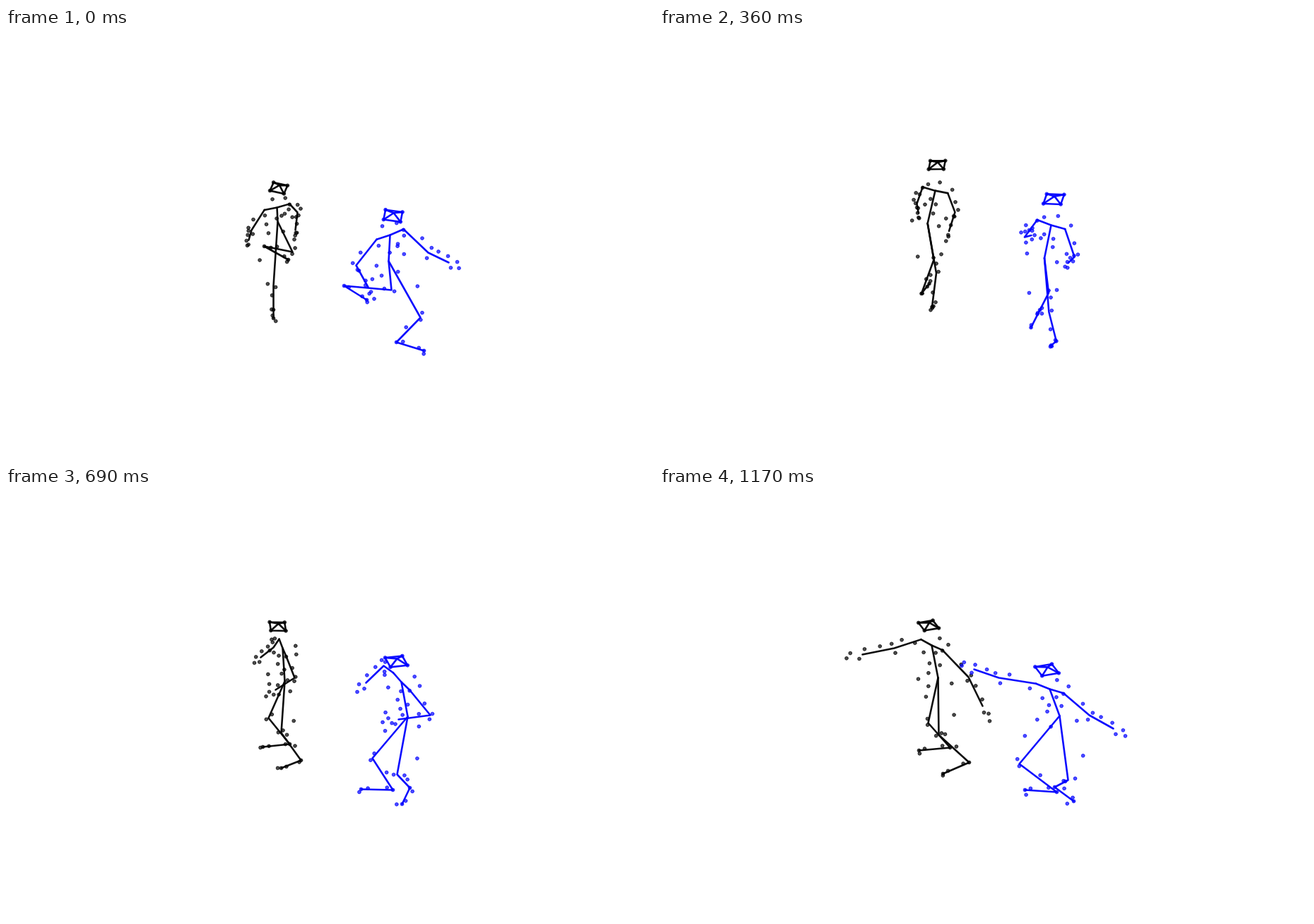
Animation, 917 px wide and 611 px high, one loop 1200 ms. Source, as an HTML page with a canvas:

```html
<!DOCTYPE html>
<html lang="en">
<head>
<meta charset="utf-8">
<title>Two dancers</title>
<style>
html, body { margin: 0; width: 100%; height: 100%; overflow: hidden; background: #fff; }
canvas { display: block; }
</style>
</head>
<body>
<canvas id="stage" width="917" height="611"></canvas>
<script>
const LOOP = 1200, STEP = 30;
const KEYS = [0, 240, 480, 690, 810, 960, 1170];
const BONES = [
  'pelvis spine neck', 'rShoulder neck lShoulder',
  'rShoulder rElbow rWrist', 'lShoulder lElbow lWrist',
  'pelvis rKnee rHeel rToe', 'pelvis lKnee lHeel lToe',
  'front right back left front', 'front crown back', 'right crown left'
].map(s => s.split(' '));
const TIPS = ['front', 'right', 'back', 'left', 'rHeel', 'rToe', 'lHeel', 'lToe'];

// Markers sit on a bone at `along`, moved outward, forward and up in the body's own axes.
const mark = (bone, along, out, fwd, up = 0) => ({ bone, along, out, fwd, up });
const TORSO = [
  mark('trunk', 1, 1.16, 0.54), mark('trunk', 1, 0, 1), mark('trunk', 1, 0, -1),
  mark('trunk', 1, -0.95, -0.8), mark('trunk', 1, -0.75, 0.5), mark('trunk', 1, -1, 0),
  mark('trunk', 0.5, 0.2, 0.4), mark('trunk', 0.5, -0.55, 0.1),
  mark('trunk', 0, 0.9, 0), mark('trunk', 0, 1.1, 1),
  mark('trunk', 0, 0, 1.2), mark('trunk', 0, -1.2, -0.1)
];
const LIMBS = [
  mark('upperArm', 0.62, 0.25, 0, 6), mark('upperArm', 1, 0.25, 0, 5),
  mark('upperArm', 1, -0.1, 0, -7), mark('forearm', 0.4, 0.15, 0, 6),
  mark('forearm', 0.9, 0.1, 0, 7), mark('forearm', 1.1, 0, 0, -6),
  mark('forearm', 1.35, 0.1, 0, 5), mark('forearm', 1.5, 0, 0, -1),
  mark('thigh', 0.63, 1, -0.6), mark('thigh', 1, 0.33, -0.35), mark('thigh', 1, -0.1, 0.2),
  mark('shin', 0.5, 0, -0.3), mark('foot', 0.35, 0, -0.4),
  mark('foot', 0.87, 0, -0.2), mark('foot', 0.85, 0, 0.5)
];
const ENDS = {
  trunk: ['pelvis', 'neck'], upperArm: ['Shoulder', 'Elbow'], forearm: ['Elbow', 'Wrist'],
  thigh: ['pelvis', 'Knee'], shin: ['Knee', 'Heel'], foot: ['Heel', 'Toe']
};
const ctx = document.getElementById('stage').getContext('2d');
const rad = deg => deg * Math.PI / 180;
const mix = (a, b, u) => [a[0] + (b[0] - a[0]) * u, a[1] + (b[1] - a[1]) * u];
const add = (p, x, y) => [p[0] + x, p[1] + y];

// Monotone cubic through the key poses, so limbs never overshoot.
function curve(value, t) {
  const last = KEYS.length - 1;
  const rate = i => (value(i + 1) - value(i)) / (KEYS[i + 1] - KEYS[i]);
  const slope = i => {
    if (i === 0) return rate(0);
    if (i === last) return rate(last - 1);
    const a = rate(i - 1), b = rate(i);
    return a * b > 0 ? 2 * a * b / (a + b) : 0;
  };
  let i = 0;
  while (i < last - 1 && t >= KEYS[i + 1]) i++;
  const d = KEYS[i + 1] - KEYS[i], u = (t - KEYS[i]) / d, w = 1 - u;
  return w * w * (1 + 2 * u) * value(i) + u * u * (3 - 2 * u) * value(i + 1)
    + u * w * d * (w * slope(i) - u * slope(i + 1));
}

class Figure {
  constructor(color, size, ...yaw) {
    Object.assign(this, { color, size, yaw, paths: {} });
  }
  // x, y at each key pose
  joint(name, ...xy) { this.paths[name] = xy; return this; }

  pose(t) {
    const at = {}, { size, paths } = this;
    for (const n in paths) {
      at[n] = [0, 1].map(axis => curve(i => paths[n][2 * i + axis], t));
    }
    const yaw = curve(i => this.yaw[i], t), c = Math.cos(rad(yaw)), s = Math.sin(rad(yaw));
    // Body axes seen from above at a slant: `out` is to the right, `fwd` ahead.
    const shift = (p, out, fwd, up = 0) => add(p,
      22 * size * (out * c + fwd * s), 14.5 * size * (out * s - fwd * c) - up * size);
    at.spine = mix(at.pelvis, at.neck, 0.5);
    at.rShoulder = shift(at.neck, 1, 0, 1);
    at.lShoulder = shift(at.neck, -1, 0, 1);

    const head = add(shift(at.neck, 0, 0.38), 0, -32);
    const gaze = Math.max(-155, 0.75 * (yaw - 90) + 10);
    ['front', 'right', 'back', 'left'].forEach((n, k) => {
      const a = rad(gaze + 90 * k), r = size * (k % 2 ? 0.88 : 1);
      at[n] = add(head, 18.5 * r * Math.cos(a), 10.5 * r * Math.sin(a));
    });
    at.crown = add(head, 1, -4);

    const spot = (m, side, sign) => {
      const [a, b] = ENDS[m.bone].map(n => at[n] || at[side + n]);
      return shift(mix(a, b, m.along), sign * m.out, m.fwd, m.up);
    };
    const dots = [
      ...TORSO.map(m => spot(m, '', 1)),
      ...LIMBS.map(m => spot(m, 'r', 1)),
      ...LIMBS.map(m => spot(m, 'l', -1)),
      ...TIPS.map(n => at[n])
    ];
    return { at, dots };
  }

  draw(t) {
    const { at, dots } = this.pose(t);
    ctx.strokeStyle = ctx.fillStyle = this.color;
    ctx.lineJoin = ctx.lineCap = 'round';
    ctx.lineWidth = 2.6;
    ctx.globalAlpha = 0.95;
    for (const bone of BONES) {
      ctx.beginPath();
      for (const n of bone) ctx.lineTo(...at[n]);
      ctx.stroke();
    }
    ctx.lineWidth = 1;
    ctx.globalAlpha = 0.7;
    for (const [x, y] of dots) {
      ctx.beginPath();
      ctx.arc(x, y, 2.4, 0, 2 * Math.PI);
      ctx.fill();
      ctx.stroke();
    }
  }
}

const black = new Figure('#000', 0.86, 160, 65, -24, -105, -132, -142, -143)
  .joint('pelvis', 384,274, 374,280, 385,273, 394,275, 393,273, 393,271, 393,270)
  .joint('neck', 383,254, 392,240, 386,224, 391,228, 391,228, 389,225, 384,224)
  .joint('rElbow', 347,286, 402,278, 424,241, 378,227, 350,221, 336,219, 331,228)
  .joint('rWrist', 343,300, 400,305, 412,262, 360,241, 322,227, 297,217, 286,237)
  .joint('lElbow', 412,261, 368,233, 361,266, 408,270, 431,269, 436,267, 436,269)
  .joint('lWrist', 409,286, 398,244, 337,282, 381,287, 415,292, 437,297, 456,310)
  .joint('rKnee', 378,365, 367,325, 407,331, 371,327, 366,337, 370,340, 379,334)
  .joint('rHeel', 378,399, 316,368, 423,384, 401,364, 395,370, 398,376, 410,369)
  .joint('rToe', 378,411, 342,351, 419,373, 363,368, 354,377, 356,382, 366,373)
  .joint('lKnee', 405,317, 420,357, 361,337, 389,348, 400,354, 404,352, 394,351)
  .joint('lHeel', 365,309, 383,395, 386,395, 417,387, 429,381, 437,379, 437,390)
  .joint('lToe', 399,328, 416,403, 357,385, 389,398, 406,400, 411,400, 400,406);

const blue = new Figure('#00f', 1, 150, 78, -30, -122, -139, -148, -152)
  .joint('pelvis', 541,330, 544,328, 543,324, 568,325, 569,324, 566,323, 565,324)
  .joint('neck', 543,293, 558,288, 548,272, 559,276, 560,280, 555,285, 551,286)
  .joint('rElbow', 495,336, 551,347, 607,289, 534,253, 508,261, 487,268, 479,270)
  .joint('rWrist', 512,367, 570,356, 580,304, 509,277, 470,266, 449,262, 444,258)
  .joint('lElbow', 597,318, 513,269, 522,323, 600,323, 612,324, 606,327, 607,323)
  .joint('lWrist', 626,332, 556,282, 508,311, 555,329, 584,348, 622,354, 641,342)
  .joint('rKnee', 545,371, 534,374, 565,376, 518,384, 512,390, 510,391, 508,392)
  .joint('rHeel', 478,365, 466,406, 583,434, 547,429, 551,432, 559,432, 561,432)
  .joint('rToe', 510,385, 492,394, 582,406, 502,428, 508,429, 514,428, 516,429)
  .joint('lKnee', 586,410, 581,410, 521,394, 553,407, 568,415, 579,413, 577,415)
  .joint('lHeel', 552,445, 558,437, 563,450, 571,426, 551,423, 556,423, 558,425)
  .joint('lToe', 591,457, 592,453, 514,447, 560,449, 575,446, 583,444, 585,445);

ctx.translate(0.5, 0.5);
const start = performance.now();
function frame() {
  const t = Math.floor((performance.now() - start) % LOOP / STEP) * STEP;
  ctx.clearRect(-1, -1, 919, 613);
  black.draw(t);
  blue.draw(t);
  requestAnimationFrame(frame);
}
frame();
</script>
</body>
</html>
```
